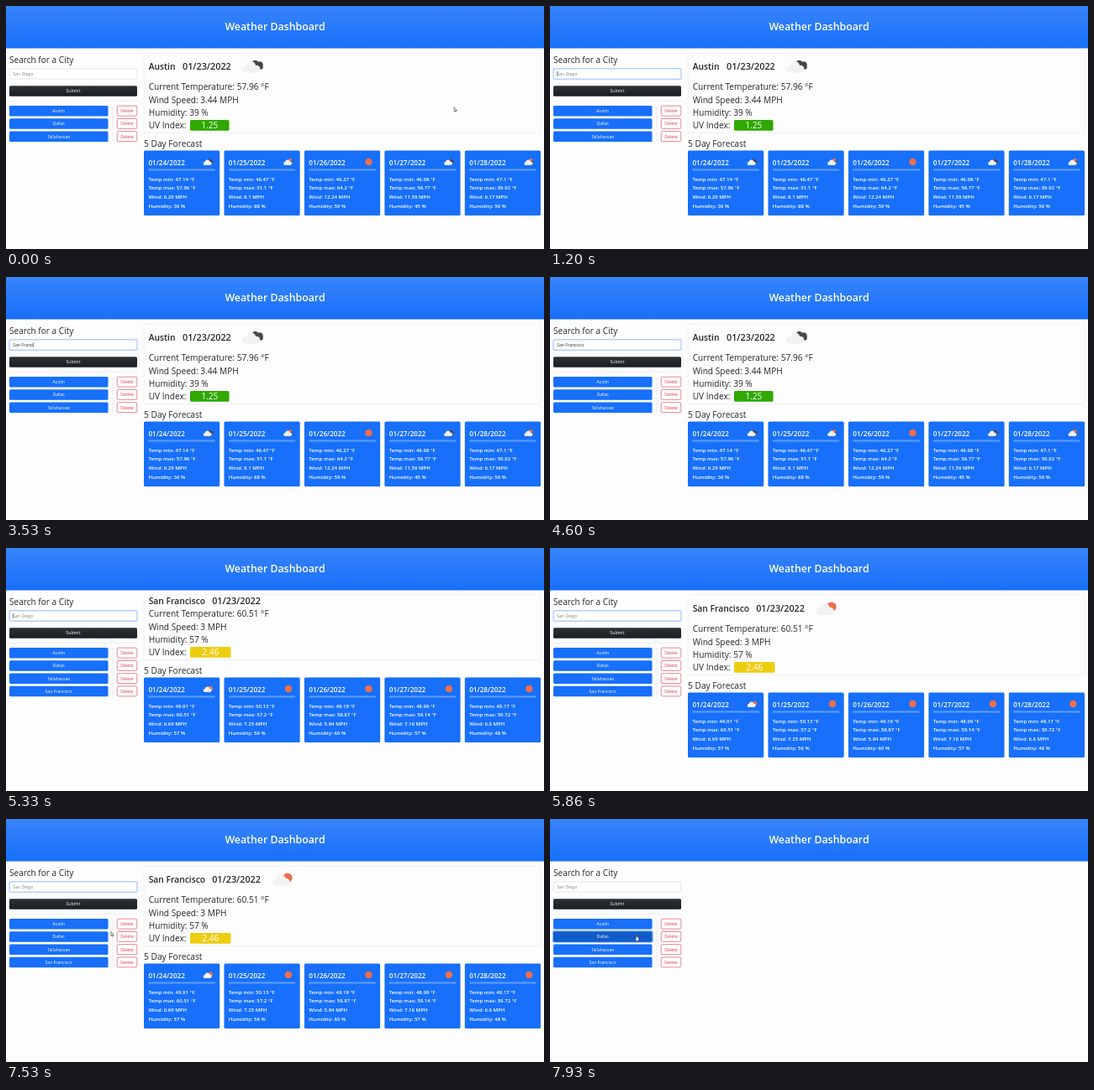
An HTML page with a canvas that plays this animation: 640 by 290 pixels, repeating every 8 s.

```html
<!DOCTYPE html>
<html lang="en">
<head>
<meta charset="utf-8">
<title>Weather Dashboard</title>
<style>
  html, body { margin: 0; width: 100%; height: 100%; overflow: hidden; background: #fdfdfd; }
  canvas { display: block; width: 640px; height: 290px; }
</style>
</head>
<body>
<canvas id="stage"></canvas>
<script>
const LOOP = 8000, BLINK = 530;
const BLUE = '#176ffa', INK = '#24282c', RED = '#dc3545', SUN = '#ec6e4c';
const FOCUS = 930, SUBMIT = 4860, LOADED = 5200, ICON = 5460, PRESS = 7800, CLEAR = 7925;
const QUERY = 'San Francisco';
const KEYS = [2200, 2330, 2460, 2600, 2860, 3000, 3060, 3200, 3330, 3460, 3660, 3800, 4000];

// Pointer stops: time, x, y
const PATH = [[60, 533, 121], [860, 70, 80], [5900, 70, 82], [6700, 279, 112], [6950, 279, 112], [7700, 102, 138]];

const CITIES = {
  austin: {
    name: 'Austin', dateX: 210, icon: 'clouds', iconX: 293.5,
    now: ['57.96', '3.44', '39'], uv: '1.25', uvColor: '#2fa800', uvW: 46.5,
    days: [
      ['47.14', '57.96', '6.29', '36', 'clouds'],
      ['46.47', '51.1', '8.1', '88', 'rain'],
      ['46.27', '64.2', '12.24', '59', 'sun'],
      ['46.98', '56.77', '11.59', '45', 'clouds'],
      ['47.1', '59.92', '6.17', '56', 'rain']
    ]
  },
  francisco: {
    name: 'San Francisco', dateX: 245.2, icon: 'partly', iconX: 329,
    now: ['60.51', '3', '57'], uv: '2.46', uvColor: '#edcd10', uvW: 48.5,
    days: [
      ['49.91', '60.51', '6.69', '57', 'partly'],
      ['50.13', '57.2', '7.25', '56', 'sun'],
      ['49.19', '58.87', '5.84', '60', 'sun'],
      ['48.99', '59.14', '7.16', '57', 'sun'],
      ['49.17', '59.72', '6.6', '48', 'sun']
    ]
  }
};

const canvas = document.getElementById('stage');
const ctx = canvas.getContext('2d');
const dpr = window.devicePixelRatio || 1;
canvas.width = 640 * dpr;
canvas.height = 290 * dpr;

function text(str, x, y, size, weight = 400, color = INK, align = 'left') {
  ctx.font = `${weight} ${size}px "Open Sans", "Noto Sans", sans-serif`;
  ctx.fillStyle = color;
  ctx.textAlign = align;
  ctx.fillText(str, x, y);
}

function box(x, y, w, h, r, fill, stroke, line = 0.6) {
  ctx.beginPath();
  ctx.roundRect(x, y, w, h, r);
  if (fill) { ctx.fillStyle = fill; ctx.fill(); }
  if (stroke) { ctx.strokeStyle = stroke; ctx.lineWidth = line; ctx.stroke(); }
}

function fade(y, h, top, bottom) {
  const g = ctx.createLinearGradient(0, y, 0, y + h);
  g.addColorStop(0, top);
  g.addColorStop(1, bottom);
  return g;
}

function dots(color, list) {
  ctx.fillStyle = color;
  for (const [x, y, r] of list) {
    ctx.beginPath();
    ctx.arc(x, y, r, 0, Math.PI * 2);
    ctx.fill();
  }
}

function weatherIcon(kind, x, y, scale) {
  ctx.save();
  ctx.translate(x, y);
  ctx.scale(scale, scale);
  if (kind === 'sun') {
    dots(SUN, [[0, -0.4, 4.3]]);
  } else {
    if (kind === 'clouds') {
      dots('#48484a', [[1.4, -1.9, 1.7], [3.9, -1, 1.9]]);
      box(1.5, -1.2, 4.3, 2.8, 1.2, '#48484a');
    }
    if (kind === 'partly') dots(SUN, [[2.8, -1, 2.7]]);
    if (kind === 'rain') {
      dots(SUN, [[2.2, -2.2, 2.2]]);
      dots('#5a5560', [[4, -0.4, 1.4]]);
    }
    dots('#f2f2f2', [[-3.9, 1.6, 1.9], [-1, -0.3, 2.7], [2.1, 1.4, 2.1]]);
    ctx.fillRect(-3.9, 0.8, 6, 2.7);
  }
  ctx.restore();
}

function header() {
  ctx.fillStyle = fade(0, 50.5, '#3884fa', BLUE);
  ctx.fillRect(0, 0, 640, 50.5);
  text('Weather Dashboard', 320, 29.2, 12.35, 600, '#fff', 'center');
}

function searchField(t) {
  const focused = t >= FOCUS && t < PRESS;
  text('Search for a City', 4, 68.2, 10.1);
  if (focused) box(3.3, 74.1, 153.4, 13.8, 2, '#c3dafd');
  box(4.2, 75, 151.6, 12, 1.5, '#fff', focused ? '#86b7fe' : '#ced4da');

  const typed = t < SUBMIT ? QUERY.slice(0, KEYS.filter(k => k <= t).length) : '';
  if (typed) text(typed, 8.2, 83, 5.1);
  else text('San Diego', 8.2, 83, 5.2, 400, '#7a828a');

  if (focused) {
    const since = t - Math.max(...[FOCUS, ...KEYS, SUBMIT].filter(k => k <= t));
    if (Math.floor(since / BLINK) % 2 === 0) {
      const x = 8.2 + (typed ? ctx.measureText(typed).width : 0);
      ctx.fillStyle = INK;
      ctx.fillRect(x, 78, 0.5, 6);
    }
  }
  box(4, 95.2, 152, 12.6, 1.5, fade(95, 13, '#2e3235', '#1b1f22'));
  text('Submit', 80, 103.4, 5.1, 400, '#fff', 'center');
}

function history(t) {
  const names = ['Austin', 'Dallas', 'Tallahassee'];
  if (t >= LOADED) names.push(QUERY);
  ctx.fillStyle = '#dcdcdd';
  ctx.fillRect(4, 112.9, 152, 0.5);
  ctx.fillRect(126.7, 119, 0.6, names.length * 15.25 - 2.8);
  names.forEach((name, i) => {
    const y = 118.9 + i * 15.25;
    const pressed = i === 1 && t >= PRESS;
    const hover = i === 1 && t >= 7620;
    if (pressed) box(2.7, y - 1.3, 120.1, 15, 2.5, '#8dbafb');
    box(4, y, 117.5, 12.5, 1.5, hover ? '#115bcb' : BLUE);
    text(name, 62.6, y + 8.1, 5.05, 400, '#fff', 'center');
    box(132.2, y + 0.3, 23.6, 11.9, 1.5, '#fff', RED);
    text('Delete', 144, y + 8.1, 5.1, 400, RED, 'center');
  });
}

function today(city, shift) {
  box(164.2, 56, 471.6, 95.6 + shift, 1.5, '#fdfdfd', '#e2e2e3', 0.5);
  const top = 76 + shift / 2;
  text(city.name, 169.7, top, 10.3, 600);
  text('01/23/2022', city.dateX, top, 10.8, 600);
  if (!shift) weatherIcon(city.icon, city.iconX, 72.3, 2.1);

  const [temp, wind, humidity] = city.now;
  const lines = [`Current Temperature: ${temp} °F`, `Wind Speed: ${wind} MPH`, `Humidity: ${humidity} %`, 'UV Index:'];
  lines.forEach((line, i) => text(line, 169.7, 100.2 + shift + i * 15.3, 10.15, 500));
  box(219, 136 + shift, city.uvW, 12.8, 1.5, city.uvColor);
  text(city.uv, 219 + city.uvW / 2, 146.1 + shift, 10.15, 500, '#fff', 'center');
}

function forecast(city, shift) {
  text('5 Day Forecast', 164, 167.5 + shift, 10.2, 500);
  city.days.forEach(([min, max, wind, humidity, icon], i) => {
    const x = 164 + i * 95.45, y = 172.4 + shift;
    box(x, y, 90.2, 77.6, 1.5, BLUE);
    text(`01/${24 + i}/2022`, x + 5.4, y + 17.6, 8.15, 600, '#fff');
    weatherIcon(icon, x + 76.5, y + 14, 1);
    ctx.fillStyle = '#5c9bfb';
    ctx.fillRect(x + 5.4, y + 22, 79.4, 2.2);
    const lines = [`Temp min: ${min} °F`, `Temp max: ${max} °F`, `Wind: ${wind} MPH`, `Humidity: ${humidity} %`];
    lines.forEach((line, n) => text(line, x + 5.4, y + 36.3 + n * 10.65, 6.05, 600, '#fff'));
  });
}

function pointerAt(t) {
  let i = 0;
  while (i < PATH.length - 2 && t >= PATH[i + 1][0]) i++;
  const [t0, x0, y0] = PATH[i], [t1, x1, y1] = PATH[i + 1];
  const p = Math.min(1, Math.max(0, (t - t0) / (t1 - t0)));
  const e = p * p * (3 - 2 * p);
  return [x0 + (x1 - x0) * e, y0 + (y1 - y0) * e];
}

function pointer(t) {
  const [x, y] = pointerAt(t);
  const inField = x < 156 && y > 74 && y < 88;
  if (inField) return;
  const onButton = y > 118 && (x < 122 || (x > 132 && x < 156));
  ctx.save();
  ctx.translate(x, y);
  ctx.beginPath();
  const points = onButton
    ? [[0.4, 0], [1.3, 0], [1.5, 2.7], [3.8, 3.4], [3.5, 6.6], [3, 7.6], [0.8, 7.6], [-1, 4.8], [-0.4, 4.2], [0.3, 5]]
    : [[0, 0], [0, 4.8], [1.1, 3.9], [1.8, 5.5], [2.6, 5.1], [1.9, 3.6], [3.3, 3.5]];
  points.forEach(([px, py]) => ctx.lineTo(px, py));
  ctx.closePath();
  ctx.fillStyle = '#fff';
  ctx.fill();
  ctx.strokeStyle = '#333';
  ctx.lineWidth = 0.6;
  ctx.stroke();
  ctx.restore();
}

function draw(t) {
  ctx.setTransform(dpr, 0, 0, dpr, 0, 0);
  ctx.fillStyle = '#fdfdfd';
  ctx.fillRect(0, 0, 640, 290);
  header();
  searchField(t);
  history(t);
  const loading = t >= SUBMIT && t < LOADED;
  if (!loading && t < CLEAR) {
    const city = t < SUBMIT ? CITIES.austin : CITIES.francisco;
    // The page sits higher until the large icon has loaded
    const shift = t >= LOADED && t < ICON ? -18 : 0;
    today(city, shift);
    forecast(city, shift);
  }
  pointer(t);
}

const start = performance.now();
function tick() {
  draw((performance.now() - start) % LOOP);
  requestAnimationFrame(tick);
}
tick();
</script>
</body>
</html>
```
